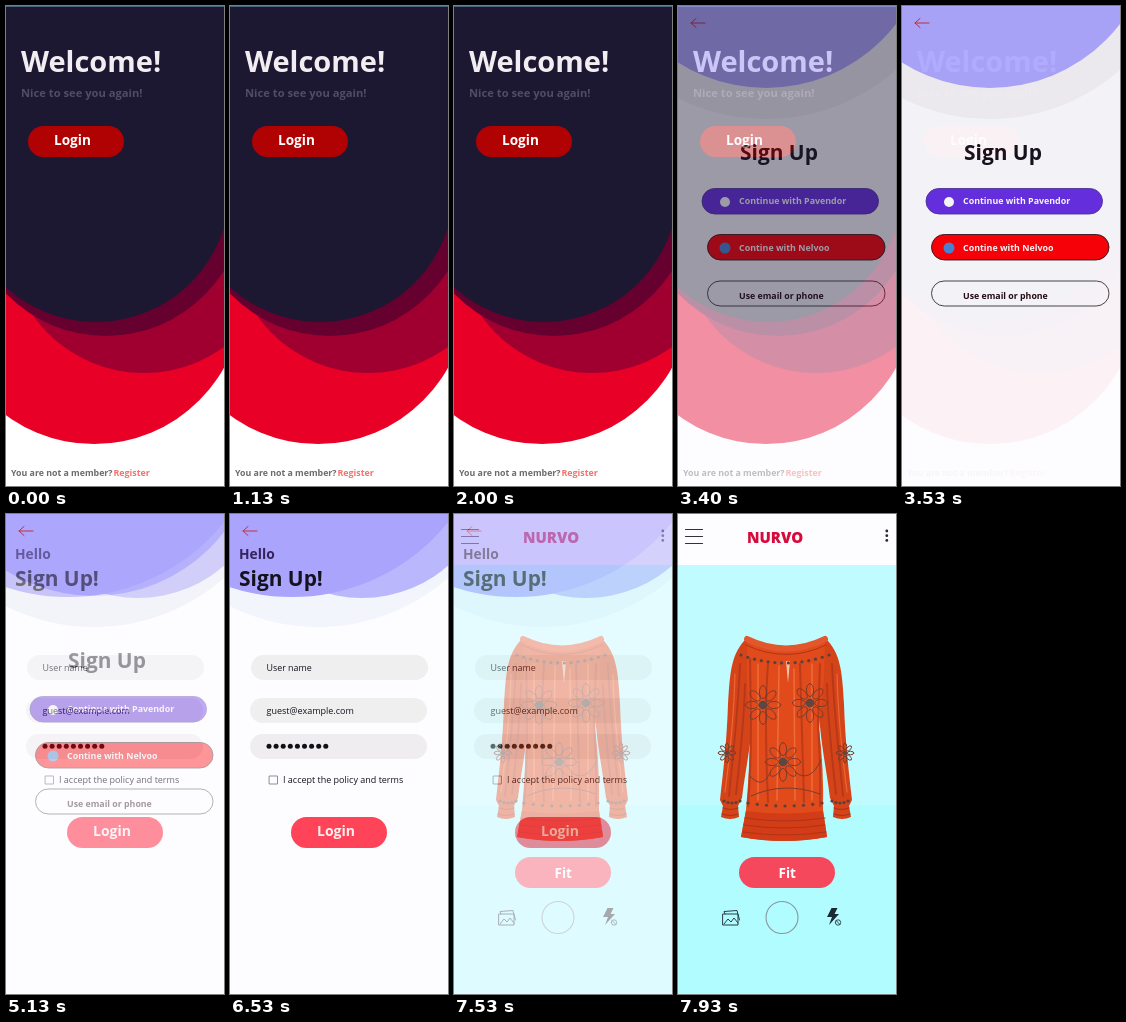
These frames come from a looping animation (218x480 px, 8 s). An HTML page with a canvas:

```html
<!DOCTYPE html>
<html lang="en">
<head>
<meta charset="utf-8">
<title>App screens</title>
<style>
html, body { margin: 0; width: 100%; height: 100%; overflow: hidden; background: #fff; }
canvas { display: block; width: 100vw; height: 100vh; }
</style>
</head>
<body>
<canvas id="stage"></canvas>
<script>
const W = 218, H = 480, LOOP = 8000, FPS = 15, FADE = 300;
const scale = Math.max(1, window.devicePixelRatio || 1);
const PAPER = '#fdfcff', INK = '#15121d';
let c; // context that the helpers draw into

function prepare(canvas) {
  canvas.width = Math.round(W * scale);
  canvas.height = Math.round(H * scale);
  const context = canvas.getContext('2d');
  context.scale(canvas.width / W, canvas.height / H);
  return context;
}

function rect(x, y, w, h, color) {
  c.fillStyle = color;
  c.fillRect(x, y, w, h);
}

function disc(x, y, r, color) {
  c.beginPath();
  c.arc(x, y, r, 0, Math.PI * 2);
  c.fillStyle = color;
  c.fill();
}

function stroke(path, color, width = 1) {
  c.strokeStyle = color;
  c.lineWidth = width;
  c.lineCap = c.lineJoin = 'round';
  c.stroke(new Path2D(path));
}

function fill(path, color) {
  c.fillStyle = color;
  c.fill(new Path2D(path));
}

function pill(x, y, w, h, color, border) {
  const r = h / 2;
  c.beginPath();
  c.arc(x + r, y + r, r, Math.PI / 2, Math.PI * 1.5);
  c.arc(x + w - r, y + r, r, -Math.PI / 2, Math.PI / 2);
  c.closePath();
  c.fillStyle = color;
  c.fill();
  if (border) {
    c.strokeStyle = border;
    c.lineWidth = 0.9;
    c.stroke();
  }
}

function text(str, x, y, size, color, weight = 700) {
  c.font = `${weight} ${size}px "Open Sans", "Noto Sans", sans-serif`;
  c.fillStyle = color;
  c.fillText(str, x, y);
}

function backArrow() {
  stroke('M13 17H27M18 12.5L13 17L18 21.5', '#bd3049');
}

function welcome() {
  rect(0, 0, W, H, '#fff');
  disc(88, 289, 149, '#e80027');
  disc(138, 231, 136, '#9f0030');
  disc(100, 191, 139, '#65002f');
  disc(90, 182, 134, '#1c1832');
  rect(0, 0, W, 183, '#1c1832');
  rect(0, 0, W, 1, '#46647a');
  text('Welcome!', 15, 65.5, 29, '#f2edf1');
  text('Nice to see you again!', 15, 91, 11.2, '#524c66');
  pill(22, 120, 96, 31, '#b00202');
  text('Login', 48, 139, 13.6, '#fff');
  text('You are not a member?', 5, 470, 8.8, '#6c6a6d');
  text('Register', 107.5, 470, 8.9, '#f2726c');
}

function signUp() {
  rect(0, 0, W, H, PAPER);
  disc(88, -84, 197, '#f5f3f6');
  disc(88, -82, 164, '#afa9ff');
  backArrow();
  text('Sign Up', 62, 154, 20.9, INK);
  pill(24, 182.5, 176.5, 25.5, '#6830e4', '#50369c');
  disc(47, 196, 5, '#fff');
  text('Continue with Pavendor', 61, 198, 8.9, '#fff');
  pill(29.5, 228.5, 177.5, 25.5, '#ff0006', '#38151b');
  disc(47, 242, 5.5, '#4b86d8');
  text('Contine with Nelvoo', 61, 244.5, 8.9, '#fff');
  pill(29.5, 275, 177.5, 25, PAPER, '#333');
  text('Use email or phone', 61, 293, 8.8, '#250b13');
}

function form() {
  rect(0, 0, W, H, PAPER);
  disc(88, -84, 197, '#f3f5fd');
  disc(132, -47, 131, '#bab7fd');
  disc(62, -117, 200, '#aaa4fd');
  backArrow();
  text('Hello', 9, 45, 13.8, '#34245c');
  text('Sign Up!', 9, 71.5, 20.9, INK);
  pill(21, 141, 177, 25, '#efeff0');
  pill(20, 184, 177, 25, '#efeff0');
  pill(20, 220, 177, 25, '#f0edf0');
  text('User name', 36.5, 157, 8.9, INK, 400);
  text('guest@example.com', 36.5, 200, 9, INK, 400);
  for (let i = 0; i < 9; i++) disc(39 + i * 7.1, 232.3, 2.5, '#121014');
  stroke('M39.5 262H47.5V270H39.5Z', '#858388', 0.9);
  text('I accept the policy and terms', 53, 268.5, 9, INK, 400);
  pill(61, 303, 96, 31, '#ff4459');
  text('Login', 87, 322.3, 14, '#fff0f0');
}

function flower(x, y, r) {
  for (let i = 0; i < 8; i++) {
    const a = i * Math.PI / 4;
    c.beginPath();
    c.ellipse(x + Math.cos(a) * r * 0.62, y + Math.sin(a) * r * 0.72, r * 0.36, r * 0.2, a, 0, Math.PI * 2);
    c.strokeStyle = '#7a3c2d';
    c.lineWidth = 1;
    c.stroke();
  }
  disc(x, y, r * 0.24, '#5e4740');
}

function beads(x0, x1, y, dip, n) {
  for (let i = 0; i < n; i++) {
    const u = i / (n - 1);
    disc(x0 + (x1 - x0) * u, y + dip * 4 * u * (1 - u), 1.6, '#5a413c');
  }
}

function sleeve() {
  fill('M69 124C53 139 52 158 50 190C49 225 45 260 42 286L45 292L43 303Q52 307 61 303L60 292L64 284C67 258 73 232 75 200L80 140Z', '#d54318');
  stroke('M62 150C60 200 55 240 51 282M67 170C66 210 62 245 58 280', '#b5381a', 1.8);
  stroke('M57 160C56 200 52 240 47 278', '#ee6634', 1.2);
  beads(46, 62, 287, 2, 5);
  stroke('M45 294Q53 297 60 294M44 300Q52 303 60 300', '#a5311a');
  flower(49, 239, 9);
}

function blouse() {
  sleeve();
  c.save();
  c.translate(216, 0);
  c.scale(-1, 1);
  sleeve();
  c.restore();
  fill('M69 126Q108 144 147 126L146 165L141 215Q146 255 145 296L149 323Q106 331 63 323L68 296Q72 250 72 215L69 165Z', '#e14a1b');
  fill('M68 297Q106 302 145 297L149 323Q106 331 63 323Z', '#d23c17');
  stroke('M72 145L73 210Q73 255 70 292M90 150Q86 200 90 288M122 150L126 288M142 150L140 210Q143 255 142 292', '#bd3b19', 2);
  stroke('M80 150L80 286M101 152L99 286M116 155L117 286M134 150L134 286', '#f06c38', 1.5);
  fill('M108 147L112 147L110 169Z', '#f3c3ab');
  stroke('M69 125Q108 144 147 125', '#e2582c', 6);
  stroke('M68 131Q108 150 148 131', '#ae3519');
  beads(63, 151, 141, 8, 14);
  flower(85, 191, 18);
  flower(132, 189, 18);
  flower(105, 248, 18);
  stroke('M72 262Q84 276 92 259M117 258Q132 270 143 246M73 282Q106 267 142 280', '#7a3c2d');
  beads(70, 144, 289, 3, 9);
  stroke('M67 304Q106 310 147 304M66 311Q106 317 147 311M65 318Q106 324 148 318', '#b03315');
}

function fitting() {
  rect(0, 0, W, H, '#b0fcff');
  rect(0, 51, W, 240, '#c0fcff');
  rect(0, 0, W, 51, PAPER);
  stroke('M7.5 15.5H24.5M7.5 22.5H24.5M7.5 29.5H24.5', '#33313a', 1.2);
  text('NURVO', 69, 28.8, 15, '#d80a3c', 800);
  for (const y of [17, 21.7, 26.4]) disc(208.8, y, 1.4, '#29262e');
  blouse();
  pill(61, 343, 96, 31, '#f6485c');
  text('Fit', 100.5, 364, 13.5, '#fff');
  c.beginPath();
  c.arc(104, 403.5, 16, 0, Math.PI * 2);
  c.strokeStyle = '#8b969c';
  c.lineWidth = 1.1;
  c.stroke();
  stroke('M47 400L46 397.5L59 396.5L61.5 406M45 400H60V411H45ZM46 410L50 405L53 408L56 404L60 409', '#283d48');
  fill('M153.5 394H159.5L156.5 400H161L151 411L154 403H149Z', '#1c2a33');
  disc(160, 408.5, 3.6, '#b0fcff');
  stroke('M157.3 408.5a2.7 2.7 0 1 0 5.4 0a2.7 2.7 0 1 0 -5.4 0M158.2 406.6L161.8 410.4', '#283d48', 0.9);
}

const layers = [welcome, signUp, form, fitting].map(paint => {
  const canvas = document.createElement('canvas');
  c = prepare(canvas);
  paint();
  return canvas;
});

const fadeStarts = [3297, 5025, 7467];
const view = prepare(document.getElementById('stage'));

function show(layer, alpha) {
  view.globalAlpha = alpha;
  view.drawImage(layer, 0, 0, W, H);
}

function draw(now) {
  // The picture advances in steps of the frame rate.
  const t = Math.floor(((now % LOOP) + 4) * FPS / 1000) * 1000 / FPS % LOOP;
  show(layers[0], 1);
  fadeStarts.forEach((start, i) => {
    const x = Math.min(1, (t - start) / FADE);
    if (x > 0) show(layers[i + 1], 1 - (1 - x) ** 2);
  });
}

const began = performance.now();
function tick() {
  draw(performance.now() - began);
  requestAnimationFrame(tick);
}
tick();
</script>
</body>
</html>
```
